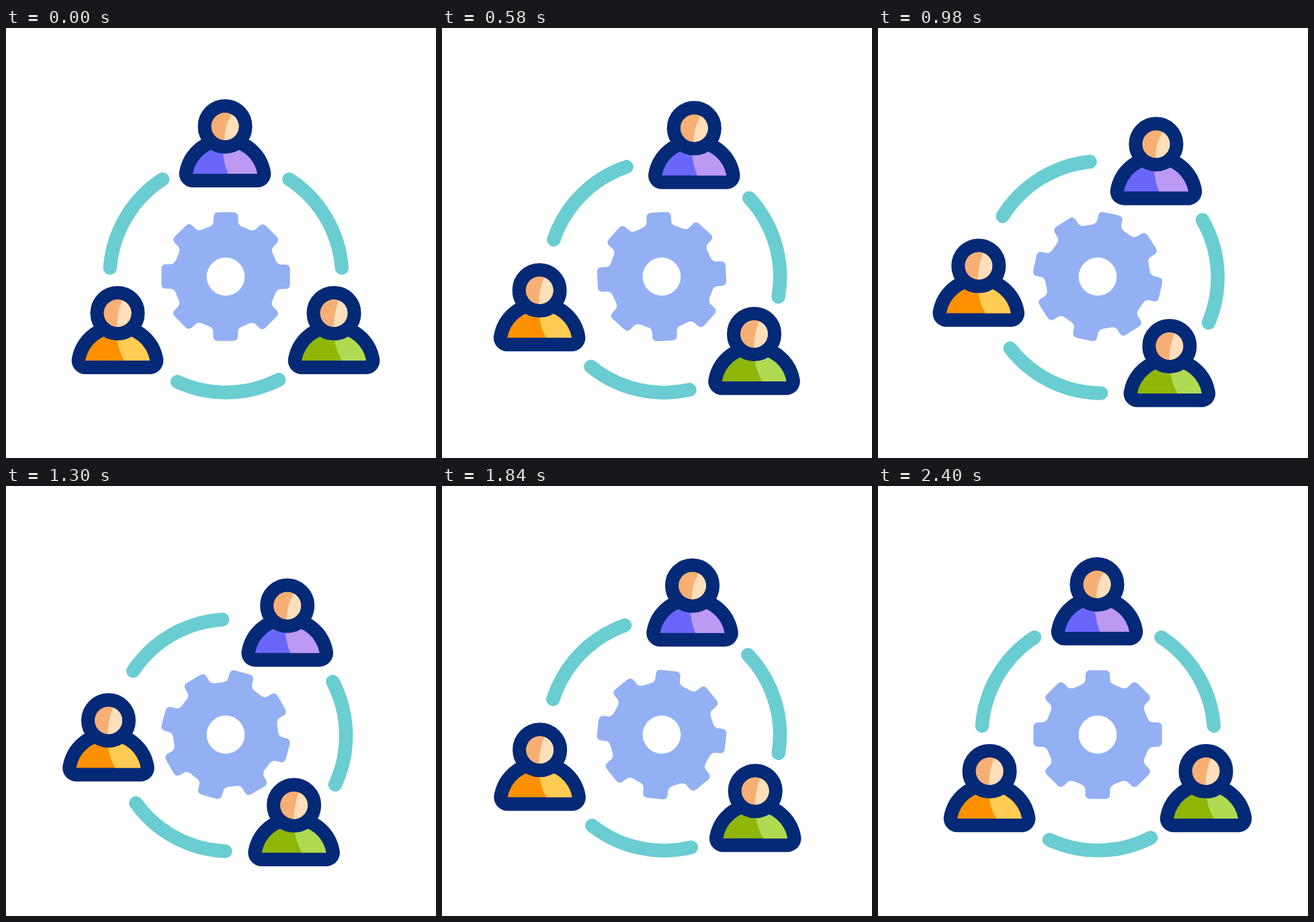
Animation, 640 px wide and 640 px high, one loop 2420 ms. Source, as an HTML page without scripts:

```html
<!DOCTYPE html>
<html lang="en">
<head>
<meta charset="utf-8">
<title>Team around a gear</title>
<style>
  html, body { margin: 0; width: 100%; height: 100%; overflow: hidden; background: #fff; }
  svg { display: block; width: 100%; height: 100%; }
  .ring { fill: none; stroke: #69cdd2; stroke-width: 20.5; stroke-linecap: round; }
  .gear { fill: #92b0f3; }
  .body { stroke: #042976; stroke-width: 40.6; stroke-linejoin: round; paint-order: stroke; }
  .head { fill: #f7af74; stroke: #042976; stroke-width: 20.3; }
  .glow { fill: #fddfbb; }
</style>
</head>
<body>
<svg viewBox="0 0 640 640">
  <defs>
    <path id="body" class="body" d="M-48 70.5A48.7 48.7 0 0 1 48 70.5Z"/>
    <g id="head">
      <circle class="head" r="30.4"/>
      <circle r="20.4" fill="#f7af74"/>
    </g>
    <path id="tooth" d="M-25-73.9Q-18.3-76.5-18.3-82.5V-88.2Q-18.3-95.7-11-95.7H11Q18.3-95.7 18.3-88.2V-82.5Q18.3-76.5 25-73.9Z"/>
    <g id="teeth">
      <use href="#tooth"/>
      <use href="#tooth" transform="rotate(90)"/>
      <use href="#tooth" transform="rotate(180)"/>
      <use href="#tooth" transform="rotate(270)"/>
    </g>
  </defs>

  <g class="ring">
    <path d="M154.8 357A173 173 0 0 1 233 225.2"/>
    <path d="M421.5 225.2A173 173 0 0 1 499.8 357"/>
    <path d="M406 523.5A173 173 0 0 1 255 526.5"/>
    <animateTransform attributeName="transform" type="rotate" dur="2.42s" repeatCount="indefinite"
      values="0 328 381.8;30 328 381.8;0 328 381.8;0 328 381.8" keyTimes="0;.49587;.99174;1"
      calcMode="spline" keySplines=".333 0 .667 1;.333 0 .667 1;0 0 1 1"/>
  </g>

  <g transform="translate(327 370)">
    <g class="gear">
      <circle r="78"/>
      <use href="#teeth"/>
      <use href="#teeth" transform="rotate(45)"/>
      <animateTransform attributeName="transform" type="rotate" dur="2.42s" repeatCount="indefinite"
        values="0;360;360" keyTimes="0;.99174;1"/>
    </g>
    <circle r="28.4" fill="#fff"/>
  </g>

  <g>
    <use href="#body" fill="#6a66fb"/>
    <path fill="#bc99f2" d="M-4 30.3Q-2 56 4.5 70.5H48A48.7 48.7 0 0 0 0 30.3Z"/>
    <use href="#head"/>
    <path class="glow" d="M9.5-18Q-1 0-1 20.3A20.3 20.3 0 0 0 9.5-18Z"/>
    <animateMotion path="M326 146.5A95.5 95.5 0 0 1 420 179.7" dur="2.42s" repeatCount="indefinite"
      keyPoints="0;1;0;0" keyTimes="0;.49587;.99174;1"
      calcMode="spline" keySplines=".333 0 .667 1;.333 0 .667 1;0 0 1 1"/>
  </g>

  <g>
    <use href="#body" fill="#ff9100"/>
    <path fill="#ffcb52" d="M-2 30.3Q1 56 10 70.5H48A48.7 48.7 0 0 0 0 30.3Z"/>
    <use href="#head"/>
    <path class="glow" d="M6.7-19.2Q-1 0-1 20.3A20.3 20.3 0 0 0 6.7-19.2Z"/>
    <animateMotion path="M166 424.5A57.8 57.8 0 0 1 153.4 347.5" dur="2.42s" repeatCount="indefinite"
      keyPoints="0;1;0;0" keyTimes="0;.49587;.99174;1"
      calcMode="spline" keySplines=".333 0 .667 1;.333 0 .667 1;0 0 1 1"/>
  </g>

  <g>
    <use href="#body" fill="#90b608"/>
    <path fill="#b1da53" d="M-1 30.3Q3 56 12 70.5H48A48.7 48.7 0 0 0 0 30.3Z"/>
    <use href="#head"/>
    <path class="glow" d="M7.2-19Q0 0-.5 20.3A20.3 20.3 0 0 0 7.2-19Z"/>
    <animateMotion path="M488 424.5A95.5 95.5 0 0 1 427 475.6" dur="2.42s" repeatCount="indefinite"
      keyPoints="0;1;0;0" keyTimes="0;.49587;.99174;1"
      calcMode="spline" keySplines=".333 0 .667 1;.333 0 .667 1;0 0 1 1"/>
  </g>
</svg>
</body>
</html>
```
